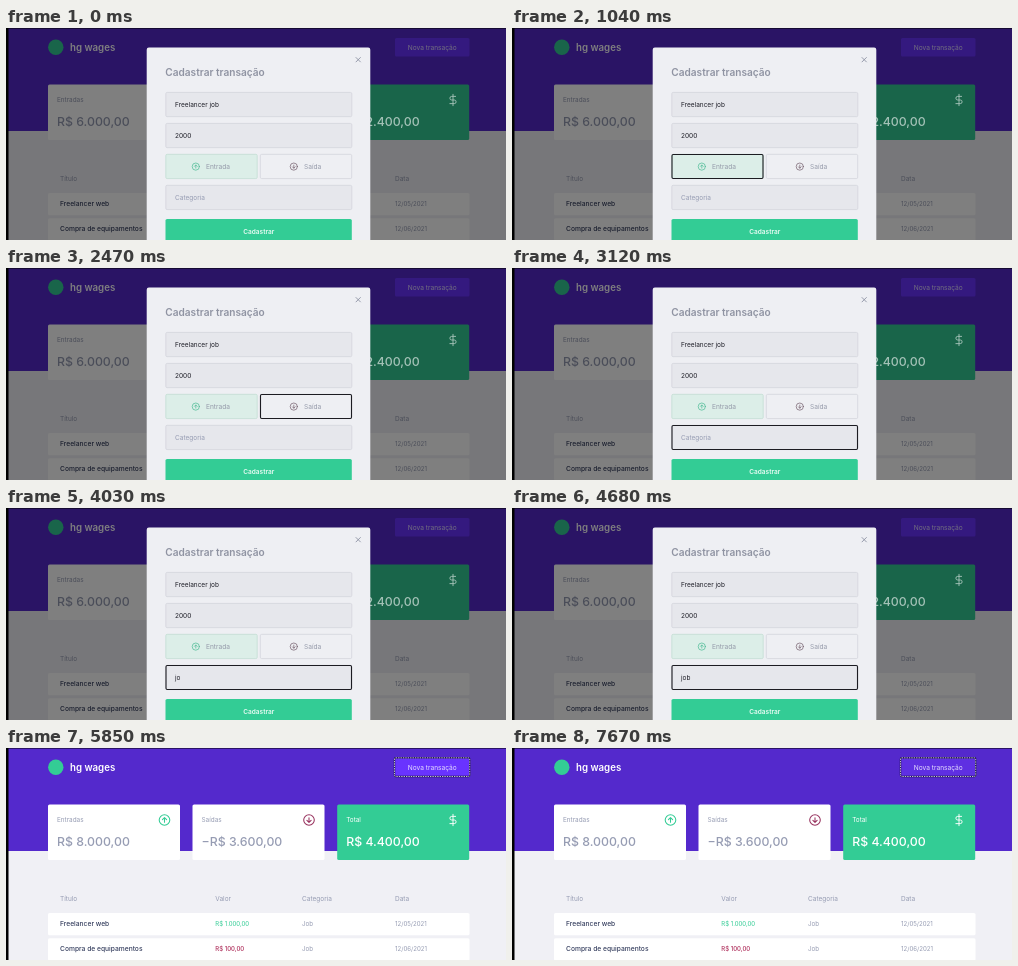
Animation, 500 px wide and 212 px high, one loop 8000 ms. Source, as an HTML page:

```html
<!DOCTYPE html>
<html lang="pt-BR">
<head>
<meta charset="utf-8">
<title>hg wages</title>
<style>
  html, body { margin: 0; width: 100%; height: 100%; overflow: hidden; background: #000; }
  svg { display: block; width: 500px; height: 212px; font-family: Inter, "Open Sans", sans-serif; }
  text { white-space: pre; }
</style>
</head>
<body>
<svg id="stage" viewBox="0 0 500 212"></svg>
<script>
const LOOP = 8000;
const C = {
  purple: '#5429cc', button: '#6933ff', page: '#f0f0f5', green: '#33cc95', red: '#b0325e',
  title: '#363f5f', body: '#969cb3', ink: '#1d1d26', ring: '#1c1c22'
};

const rect = (x, y, w, h, fill, more = '') =>
  `<rect x="${x}" y="${y}" width="${w}" height="${h}" fill="${fill}" ${more}/>`;
const text = (x, y, str, size, fill, weight = 400, more = '') =>
  `<text x="${x}" y="${y}" font-size="${size}" fill="${fill}" font-weight="${weight}" ${more}>${str}</text>`;
const ring = (id, x, y, w, h) =>
  rect(x, y, w, h, 'none', `id="${id}" rx="1.2" stroke="${C.ring}" stroke-width="1.1"`);

// Circle with an arrow: dir is -1 for up, 1 for down
const arrow = (x, y, r, color, dir) =>
  `<g transform="translate(${x} ${y}) scale(${r} ${r * dir})" fill="none" stroke="${color}"
    stroke-width=".2" stroke-linecap="round" stroke-linejoin="round">
    <circle r="1"/><path d="M0-.42V.42M-.4 .05L0 .45L.4 .05"/></g>`;

const dollar = `<path transform="translate(440.8 65.8) scale(.517)" fill="none" stroke="#fff"
  stroke-width="1.8" stroke-linecap="round"
  d="M12 1V23M17 5H9.5a3.5 3.5 0 0 0 0 7h5a3.5 3.5 0 0 1 0 7H6"/>`;

const card = (x, fill) => rect(x, 56.5, 132, 55.5, fill, 'rx="1.6"');
const amount = (x, label, id, color, icon) =>
  text(x + 9, 74.4, label, 6.4, color) +
  text(x + 9, 98, '', 12.3, color, 500, `id="${id}"`) + icon;

function row(y, name, value, color, weight, date) {
  const base = y + 13;
  return rect(42, y, 421.5, 22.3, '#fff', 'rx="1.6"') +
    text(54, base, name, 6.7, C.title, 500) +
    text(209.3, base, value, 6, color, weight) +
    text(296, base, 'Job', 6.3, C.body) +
    text(389, base, date, 6.1, C.body);
}

function field(y, value, color, id = '') {
  return rect(159.8, y, 186, 24.3, '#e6e7ec', 'rx="1.4" stroke="#d3d5dc" stroke-width=".8"') +
    text(169, y + 14.6, value, 6.5, color, 400, id && `id="${id}"`);
}

function choice(x, label, fill, edge, iconX, iconColor, dir) {
  return rect(x, 126.3, 91.4, 24.3, fill, `rx="1.4" stroke="${edge}" stroke-width=".8"`) +
    arrow(iconX, 138.6, 3.6, iconColor, dir) +
    text(iconX + 10.2, 140.9, label, 6.6, '#9499a9');
}

const page =
  rect(0, 0, 500, 212, C.page) + rect(0, 0, 500, 103, C.purple) +
  `<circle cx="49.8" cy="19.3" r="7.7" fill="${C.green}"/>` +
  text(64, 22.8, 'hg wages', 9.7, '#fff', 600) +
  rect(389, 10, 74.5, 18.5, C.button, 'id="open" rx="1.6"') +
  text(426.3, 21.7, 'Nova transação', 6.6, '#e6deff', 400, 'text-anchor="middle"') +
  '<g id="openRing">' +
  rect(388.5, 9.8, 75.2, 18.7, 'none', 'rx="1.2" stroke="#1a0f45" stroke-width="1.4"') +
  rect(388.5, 9.8, 75.2, 18.7, 'none',
    'rx="1.2" stroke="#fff" stroke-width=".9" stroke-dasharray="1.4 1" opacity=".8"') + '</g>' +
  card(42, '#fff') + card(186.5, '#fff') + card(331.2, C.green) +
  amount(42, 'Entradas', 'income', C.body, arrow(158.5, 72, 5.3, C.green, -1)) +
  amount(186.5, 'Saídas', 'outcome', C.body, arrow(303, 72, 5.3, '#98335f', 1)) +
  [[54, 'Título'], [209.3, 'Valor'], [296, 'Categoria'], [389, 'Data']]
    .map(([x, label]) => text(x, 153, label, 6.5, C.body)).join('') +
  row(165, 'Freelancer web', 'R$ 1.000,00', C.green, 400, '12/05/2021') +
  row(190.2, 'Compra de equipamentos', 'R$ 100,00', C.red, 500, '12/06/2021');

const shade = rect(0, 0, 500, 212, '#000', 'id="shade" opacity=".5"');

// Stays brighter than the rest of the shaded page
const total = '<g id="totalGroup">' + amount(331.2, 'Total', 'total', '#fff', dollar) + '</g>';

const modal = '<g id="modal">' +
  rect(140.7, 19.6, 223.6, 200, '#eeeff3', 'rx="2.2"') +
  '<path d="M350 29.5l4.4 4.4m0-4.4l-4.4 4.4" stroke="#8d92a3" stroke-width=".9" stroke-linecap="round"/>' +
  text(159.3, 48.4, 'Cadastrar transação', 10.1, '#8f93a2', 600) +
  field(64.4, 'Freelancer job', C.ink) +
  field(95.4, '2000', C.ink) +
  choice(159.8, 'Entrada', '#dceee8', '#c3ddd4', 189.8, '#4dbb96', -1) +
  choice(254.3, 'Saída', '#eeeff3', '#d3d5dc', 287.8, '#75606f', 1) +
  field(157.3, '', C.ink, 'category') +
  rect(159.5, 191, 186.3, 25, C.green, 'id="submit" rx="1.6"') +
  text(252.8, 206, 'Cadastrar', 6.5, '#e9fbf4', 600, 'text-anchor="middle"') +
  ring('ringIn', 160, 126.5, 91, 24) +
  ring('ringOut', 254.5, 126.5, 91, 24) +
  ring('ringCategory', 160, 157.5, 185.5, 24) +
  ring('ringSubmit', 160, 191.5, 185.5, 26) + '</g>';

document.getElementById('stage').innerHTML = page + shade + total + modal +
  rect(0, 0, 2.5, 212, '#000') + rect(0, 0, 500, 1, '#000', 'opacity=".5"');

const $ = id => document.getElementById(id);
const show = (id, on) => $(id).setAttribute('visibility', on ? 'inherit' : 'hidden');

// Focus and typing steps: [start ms, value]
const FOCUS = [[0, ''], [1040, 'ringIn'], [2470, 'ringOut'], [3120, 'ringCategory'], [4810, 'ringSubmit']];
const TYPED = [[0, ''], [3640, 'j'], [4030, 'jo'], [4680, 'job']];
const CLOSE = 5850;
const at = (steps, t) => steps.filter(([start]) => start <= t).pop()[1];

function render(t) {
  const open = t < CLOSE;
  for (const id of ['shade', 'modal']) $(id).style.display = open ? '' : 'none';
  show('openRing', !open);
  $('open').setAttribute('fill', t < 7670 ? C.button : '#5f2fe2');
  $('income').textContent = open ? 'R$ 6.000,00' : 'R$ 8.000,00';
  $('outcome').textContent = '−R$ 3.600,00';
  $('total').textContent = open ? 'R$ 2.400,00' : 'R$ 4.400,00';
  $('totalGroup').setAttribute('opacity', open ? .6 : 1);

  const focus = at(FOCUS, t);
  for (const id of ['ringIn', 'ringOut', 'ringCategory', 'ringSubmit']) show(id, id === focus);

  const typed = at(TYPED, t);
  $('category').textContent = typed || 'Categoria';
  $('category').setAttribute('fill', typed ? C.ink : C.body);

  const fade = Math.min(1, Math.max(0, (t - 4810) / 260));
  $('submit').style.filter = `brightness(${1 - .1 * fade})`;
}

function tick() {
  render(performance.now() % LOOP);
  requestAnimationFrame(tick);
}
tick();
</script>
</body>
</html>
```
